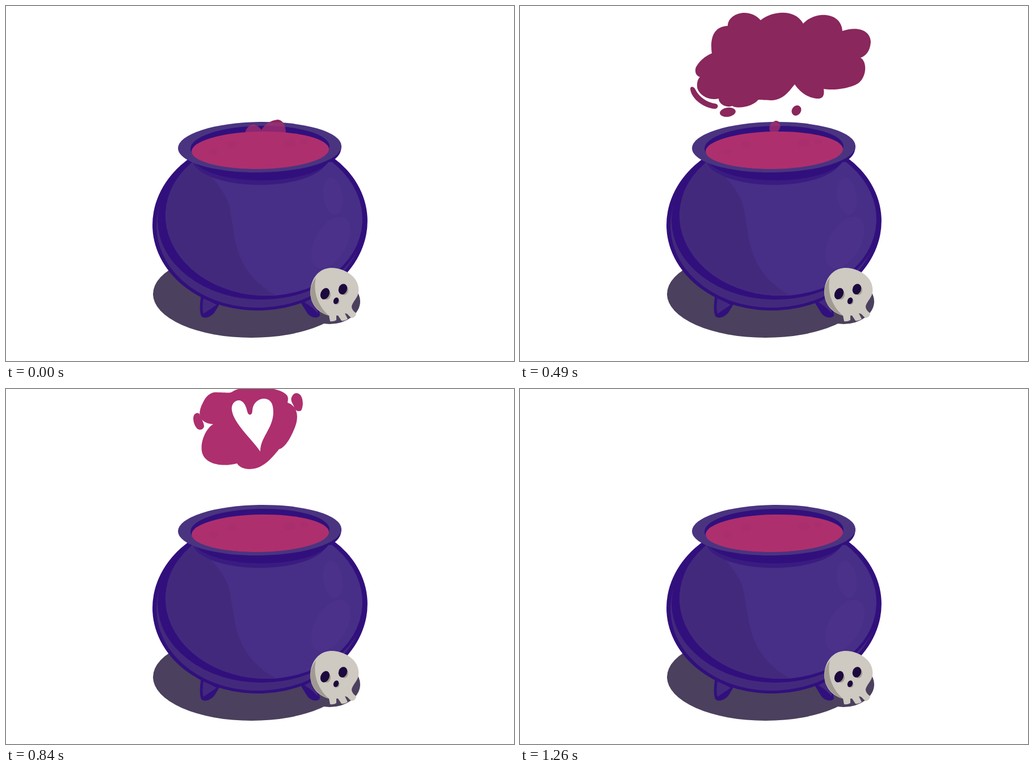
These frames come from a looping animation (895 px wide and 625 px high, 1470 ms). An HTML page without scripts:

```html
<!DOCTYPE html>
<html lang="en">
<head>
<meta charset="utf-8">
<title>Love potion</title>
<style>
html, body { margin: 0; width: 100%; height: 100%; overflow: hidden; background: #fff; }
svg { display: block; width: 100%; height: 100%; }

/* Each drawing holds for 70 ms of the 1470 ms loop. */
.smoke > g {
  visibility: hidden;
  animation: hold 1470ms step-end infinite;
  animation-delay: calc(var(--i) * 70ms - 1470ms);
}
@keyframes hold {
  0% { visibility: visible; }
  4.7619%, 100% { visibility: hidden; }
}
.smoke { fill: url(#vapour); }
.gap { fill: #fff; }
.dark { fill: #31107d; }
.shade { fill: #43297c; }
.rim { fill: #4a3480; }
.shine { fill: #4c318a; }
.bone { fill: #cec9c1; }
.boneShade { fill: #a09a91; }
.socket { fill: #1c0a3e; }
</style>
</head>
<body>
<svg viewBox="0 0 895 625">
<defs>
  <!-- Vapour turns translucent where it passes in front of the rim. -->
  <linearGradient id="vapour" gradientUnits="userSpaceOnUse" x1="0" y1="0" x2="0" y2="410">
    <stop offset=".5" stop-color="#8a275c"/>
    <stop offset=".5" stop-color="#ad2f6e" stop-opacity=".73"/>
  </linearGradient>
  <clipPath id="belly"><ellipse cx="454.5" cy="372" rx="173.5" ry="138" transform="rotate(3 454.5 372)"/></clipPath>

  <path id="cloud" d="M338 84C334 55 342 36 366 35C366 14 402 1 424 25C444 9 484 4 499 31C520 8 566 10 568 44C590 36 617 40 618 63C617 80 609 88 600 91C612 98 611 125 596 136C580 146 550 149 535 146C537 158 533 164 523 163C505 161 492 150 484 138C474 150 465 164 445 166C435 166 425 165 420 165C410 177 385 182 374 176C364 180 350 173 350 163C330 168 311 153 312 140C312 132 314 128 317 125C307 122 308 110 311 106C318 94 330 86 341 82Z"/>
  <path id="puff" d="M336 45C336 18 356 8 370 9C383 10 390 15 394 19C408 2 446 3 460 27C478 8 528 2 541 34C558 20 586 24 592 50C595 70 580 86 564 93C575 98 574 112 562 119C540 130 495 132 469 122C468 140 436 156 408 157C390 157 375 157 371 151C360 163 330 170 316 155C307 142 309 122 321 115C308 98 306 56 336 45Z"/>
  <path id="wreath" d="M365 62C340 60 336 44 347 24C352 12 362 4 373 6C390 6 395 8 400 4C420 -8 480 -5 494 10C498 14 497 19 496 24C514 30 517 50 508 70C500 90 490 104 481 106C466 125 450 142 427 141C416 140 410 136 407 131C385 137 350 135 345 110C342 90 354 68 365 62Z"/>
  <path id="heart" d="M448 110C435 90 402 62 398 38C396 26 404 19 412 20C424 24 424 40 427 44C431 47 434 44 434 38C435 24 445 17 455 17C468 18 471 28 471 42C470 70 448 85 448 110Z"/>
  <g id="bits">
    <path d="M364 22C364 8 385 0 400 1C404 1 408 3 409 4C418 -1 430 1 434 6C445 0 461 4 462 15C463 28 450 34 437 32C430 38 414 40 405 33C393 38 370 40 364 22Z"/>
    <path d="M475 28C473 15 483 7 491 8C499 9 502 16 501 24C512 23 517 34 513 43C523 49 523 62 517 69C512 75 511 74 511 76C513 90 505 94 497 93C488 92 486 86 485 81C474 80 465 71 467 60C464 56 466 50 467 50C464 40 468 30 475 28Z"/>
    <path d="M362 72C360 60 372 55 377 52C386 46 396 52 400 57C408 64 407 75 406 80C418 82 426 92 424 100C421 108 417 108 417 109C419 120 410 127 396 124C392 130 375 131 373 117C374 112 373 110 368 107C360 100 361 87 367 83C364 80 363 77 362 72Z"/>
    <path d="M454 96C453 84 465 82 470 89C485 85 496 93 494 104C500 118 490 133 469 134C466 146 448 154 438 149C432 144 435 138 437 136C430 125 440 100 454 96Z"/>
  </g>
  <g id="sparks">
    <ellipse cx="337" cy="12" rx="10" ry="7" transform="rotate(-35 337 12)"/>
    <ellipse cx="303" cy="64" rx="7.5" ry="11" transform="rotate(15 303 64)"/>
    <path d="M580 14C580 8 589 8 590 13C591 19 597 24 595 30C593 35 585 35 584 29C583 24 579 20 580 14Z"/>
    <ellipse cx="588" cy="91" rx="8" ry="13" transform="rotate(35 588 91)"/>
  </g>
</defs>

<g fill="#4b405d">
  <ellipse cx="432.5" cy="507" rx="173.5" ry="77"/>
  <ellipse cx="570" cy="520" rx="54" ry="40"/>
</g>

<g id="cauldron">
  <path class="dark" d="M344 508C341 525 341 539 344 546C350 552 361 547 367 540L378 522ZM518 520L531 541C537 549 549 551 553 545C553 537 548 524 535 505Z"/>
  <path class="shade" d="M348 514C346 526 346 536 348 542C356 536 366 530 371 526ZM526 522C534 526 544 534 549 541C550 534 545 524 538 514Z"/>
  <g transform="rotate(-3 447.5 383)">
    <ellipse class="dark" cx="447.5" cy="382" rx="189.5" ry="154"/>
    <ellipse class="shade" cx="447.5" cy="383" rx="182.5" ry="148"/>
  </g>
  <ellipse class="dark" cx="450" cy="377" rx="183" ry="140"/>
  <g clip-path="url(#belly)">
    <path fill="#472e87" d="M270 220H640V520H270Z"/>
    <path class="shade" d="M270 240L326 277C355 286 382 322 391 345C399 370 399 403 409 432C420 468 445 493 478 511L270 520Z"/>
  </g>
  <ellipse class="shine" cx="576" cy="335" rx="17" ry="33" transform="rotate(-9 576 335)"/>
  <ellipse class="shine" cx="572" cy="416.5" rx="28" ry="50" transform="rotate(30 572 416.5)"/>
  <ellipse fill="#3a1c80" cx="447" cy="268" rx="120" ry="47"/>
  <ellipse class="dark" cx="450" cy="264" rx="122" ry="43"/>
  <path class="dark" d="M591 245C591 260 585 266 572 275L540 270Z"/>
  <ellipse class="rim" cx="447" cy="248.5" rx="144" ry="44.5" transform="rotate(-.8 447 248.5)"/>
  <ellipse class="dark" cx="447.5" cy="249" rx="122.5" ry="38" transform="rotate(-1 447.5 249)"/>
</g>

<g class="smoke">
  <g style="--i:0"><path d="M421 224C424 211 433 208 438 209C445 211 449 217 450 218C456 208 467 201 479 200C488 201 493 210 493 224Z"/></g>
  <g style="--i:1"><path d="M440 224C455 205 420 190 425 165C430 140 470 125 485 150C500 170 478 185 486 200C492 212 484 218 482 224Z"/></g>
  <g style="--i:2"><path d="M447 224C462 204 425 195 420 175C414 150 425 130 415 110C405 80 450 50 485 65C520 80 505 115 475 130C450 145 455 165 480 172C505 182 494 205 484 224Z"/></g>
  <g style="--i:3"><path d="M449 224C460 208 462 200 455 192C440 184 415 186 418 168C425 150 435 142 425 130C395 125 370 110 375 85C385 50 440 20 490 20C540 20 565 45 550 75C535 105 490 115 465 130C450 142 450 160 462 166C485 170 503 182 494 202L484 224Z"/></g>
  <g style="--i:4"><path d="M432 132C415 130 385 136 364 127C349 120 341 108 342 93C345 66 370 42 405 25C440 8 490 0 525 2C575 3 606 18 605 48C603 75 575 95 545 106C515 118 480 127 465 134C453 141 449 154 454 163C460 172 484 168 494 178C506 190 494 205 484 224L450 224C458 213 467 203 462 196C456 186 430 190 420 185C412 178 417 168 425 160C432 150 437 140 432 132Z"/></g>
  <g style="--i:5"><path d="M428 143C400 145 335 150 326 118C322 95 340 75 352 62C365 38 395 22 425 22C455 5 500 5 520 14C560 5 600 20 606 42C632 55 632 85 612 100C590 125 530 125 500 133C475 138 458 146 460 160C468 172 490 172 490 188C489 205 478 212 473 224L450 224C456 212 466 204 461 196C450 186 428 188 424 176C426 164 434 154 428 143Z"/></g>
  <g style="--i:6">
    <use href="#cloud" x="10" y="-5"/>
    <path d="M466 172C474 170 490 174 489 188C488 202 474 210 468 224L446 224C450 210 464 203 464 195C462 187 456 178 466 172Z"/>
  </g>
  <g style="--i:7">
    <use href="#cloud"/>
    <path d="M300 146C300 141 306 141 309 147C316 161 330 170 345 172C351 174 349 181 343 181C326 180 302 165 300 146Z"/>
    <ellipse cx="366" cy="187" rx="14" ry="8" transform="rotate(-8 366 187)"/>
    <ellipse cx="487" cy="184" rx="8" ry="9.5" transform="rotate(35 487 184)"/>
    <ellipse cx="449" cy="213" rx="9" ry="11.5" transform="rotate(30 449 213)"/>
  </g>
  <g style="--i:8">
    <use href="#puff" transform="translate(-6 4) scale(1.03)"/>
    <ellipse cx="297" cy="118" rx="8" ry="14" transform="rotate(-20 297 118)"/>
    <ellipse cx="600" cy="104" rx="8" ry="13" transform="rotate(35 600 104)"/>
    <ellipse cx="480" cy="158" rx="8" ry="10" transform="rotate(30 480 158)"/>
  </g>
  <g style="--i:9">
    <use href="#puff"/>
    <use href="#sparks"/>
    <path class="gap" d="M402 72C402 65 409 63 414 67C417 70 418 74 421 73C428 72 426 65 428 57C432 51 440 55 441 67C443 78 440 87 435 97C425 94 403 88 402 72Z"/>
  </g>
  <g style="--i:10">
    <use href="#puff" transform="translate(44 2) scale(.9 .95)"/>
    <use href="#sparks" transform="translate(30 0) scale(.94 1)"/>
    <use href="#heart" class="gap" transform="translate(157 30) scale(.62)"/>
  </g>
  <g style="--i:11">
    <use href="#wreath" transform="translate(-68 2) scale(1.17 1.03)"/>
    <ellipse cx="322" cy="60" rx="8" ry="14" transform="rotate(-10 322 60)"/>
    <ellipse cx="544" cy="24" rx="9" ry="15" transform="rotate(-10 544 24)"/>
    <use href="#heart" class="gap" transform="translate(76 14) scale(.82)"/>
  </g>
  <g style="--i:12" fill="#ad2f6e">
    <use href="#wreath"/>
    <path d="M330 52C330 43 337 40 341 44C343 51 349 59 349 66C347 73 340 73 336 69C332 64 330 58 330 52Z"/>
    <path d="M503 15C506 6 514 5 519 11C524 18 524 31 520 38C514 41 508 37 507 30C505 25 501 21 503 15Z"/>
    <use href="#heart" class="gap"/>
  </g>
  <g style="--i:13">
    <use href="#bits" stroke="#8a275c" stroke-width="14"/>
    <ellipse cx="345" cy="48" rx="8" ry="13"/>
    <ellipse cx="525" cy="20" rx="8" ry="12"/>
  </g>
  <g style="--i:14">
    <use href="#bits"/>
    <ellipse cx="356" cy="40" rx="7.5" ry="9.5"/>
    <ellipse cx="469" cy="9" rx="5" ry="8" transform="rotate(10 469 9)"/>
    <ellipse cx="433" cy="75" rx="7" ry="9.5" transform="rotate(15 433 75)"/>
    <ellipse cx="526" cy="87" rx="7" ry="10.5" transform="rotate(35 526 87)"/>
  </g>
  <g style="--i:15">
    <use href="#bits" y="-8" stroke="#fff" stroke-width="15"/>
    <ellipse cx="433" cy="66" rx="5" ry="7"/>
    <ellipse cx="527" cy="74" rx="5" ry="8" transform="rotate(35 527 74)"/>
  </g>
  <g style="--i:16">
    <ellipse cx="385" cy="14" rx="12" ry="8"/>
    <ellipse cx="380" cy="70" rx="10" ry="13"/>
    <ellipse cx="496" cy="42" rx="10" ry="14"/>
    <ellipse cx="463" cy="74" rx="9" ry="11"/>
    <ellipse cx="526" cy="62" rx="5" ry="7"/>
  </g>
  <g style="--i:17">
    <ellipse cx="387" cy="10" rx="6" ry="5"/>
    <ellipse cx="380" cy="55" rx="5" ry="7"/>
    <ellipse cx="498" cy="28" rx="5" ry="8"/>
  </g>
</g>

<ellipse fill="#ae2f6e" cx="448" cy="254" rx="121" ry="33" transform="rotate(-1 448 254)"/>
<g fill="#a92e6d">
  <ellipse cx="365" cy="257" rx="8" ry="6"/>
  <ellipse cx="398" cy="244" rx="9" ry="6"/>
  <ellipse cx="500" cy="242" rx="11" ry="7"/>
  <ellipse cx="525" cy="239" rx="7" ry="5"/>
</g>

<g id="skull">
  <path class="bone" d="M536 503C537 480 551 462 572 461C590 461 603 468 612 477C621 487 622 497 621 505C619 514 610 522 609 529C609 534 613 538 617 541Q617 546 611 549L608 549L601 542L597 541L602 551Q597 555 591 554L585 545L582 545L582 553Q577 556 571 555L569 545C552 541 536 527 536 503Z"/>
  <path class="boneShade" d="M546 478C535 492 534 507 540 521C546 533 556 541 569 545C551 530 540 505 546 478Z"/>
  <g class="boneShade">
    <ellipse cx="565" cy="508" rx="7" ry="9"/>
    <ellipse cx="596" cy="500" rx="7" ry="9"/>
    <ellipse cx="583" cy="520" rx="4.5" ry="5.5"/>
  </g>
  <g class="socket">
    <ellipse cx="562" cy="506.5" rx="7.5" ry="10.5" transform="rotate(25 562 506.5)"/>
    <ellipse cx="593.5" cy="498.5" rx="7.5" ry="9.5" transform="rotate(20 593.5 498.5)"/>
    <ellipse cx="581.5" cy="519" rx="4.5" ry="6" transform="rotate(20 581.5 519)"/>
  </g>
</g>
</svg>
</body>
</html>
```
